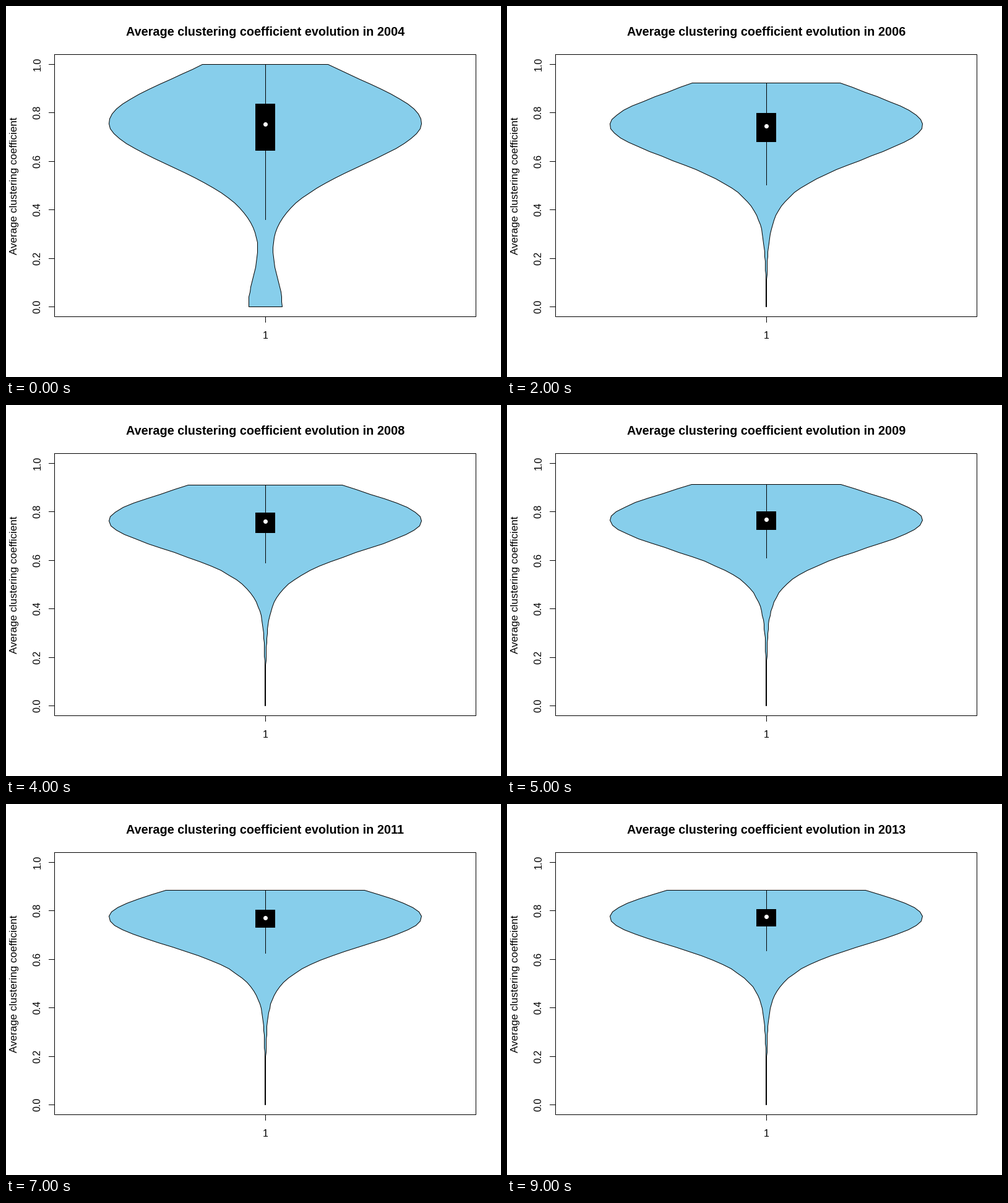
These frames come from a looping animation (800x600 px, 10000 ms). A matplotlib script:

```python
import numpy as np
import matplotlib.pyplot as plt
from matplotlib.animation import FuncAnimation
from matplotlib.patches import Circle, Polygon, Rectangle

W, H, DPI = 800, 600, 100
PX = 72 / DPI                        # points per pixel
MID, BASE, HALF = 418.6, 486, 252.6  # violin centre, zero level, half width
FONT = "Liberation Sans"


def settle(i):
    """Falls from 1 towards 0 as the yearly distributions narrow."""
    return 1 / (1 + (i / 1.75) ** 2.2)


def top_of(i):
    return round(np.interp(i, [0, 1, 2, 3, 5, 7], [94, 94, 124, 130, 128, 139]))


def outline(i):
    """Bell curve with a widening lower tail and an early bump at zero."""
    mode = np.interp(i, [0, 2, 3, 7, 9], [188, 192, 188, 183, 182.5])
    y = np.linspace(top_of(i), BASE, 50)
    d = y - mode
    growth = 4.2 - 2.8 * settle(i)
    sigma = 45 + 24.7 * settle(i) + growth * (np.maximum(d, 0) / 100) ** 2
    half = np.exp(-0.5 * (d / sigma) ** 2)
    half *= HALF / half.max()
    bump = max(0, 26.7 - 13.35 * i)
    half += bump * np.exp(-0.5 * ((BASE - y) / 54) ** 2)
    xs = np.concatenate([MID - half, (MID + half)[::-1]])
    return np.round(np.column_stack([xs, np.concatenate([y, y[::-1]])]))


def quartiles(i):
    median = np.interp(i, [0, 1, 3, 5, 9], [191, 196, 191, 185, 182])
    height = 26 + 50 * settle(i)
    upper = median - 0.43 * height
    lower = upper + height
    return [round(v) for v in (upper, median, lower, lower + 1.45 * height)]


# Whole numbers are pixel centres.
fig = plt.figure(figsize=(W / DPI, H / DPI), dpi=DPI, facecolor="white")
ax = fig.add_axes([0, 0, 1, 1])
ax.set_xlim(-0.5, W - 0.5)
ax.set_ylim(H - 0.5, -0.5)
ax.axis("off")


def line(xs, ys, z=1):
    return ax.plot(xs, ys, color="black", lw=PX, snap=False, zorder=z,
                   solid_capstyle="projecting", solid_joinstyle="miter")[0]


def label(x, y, text, size, **kw):
    return ax.text(x, y, text, fontsize=size * PX, family=FONT, ha="center",
                   va="baseline", rotation_mode="anchor", **kw)


line([78, 759, 759, 78, 78], [78, 78, 502, 502, 78])
line([419, 419], [502, 511])
label(418.5, 537, "1", 16)
for k in range(6):
    y = round(BASE - 78.4 * k)
    line([69, 78], [y, y])
    label(55, y - 1, f"{k / 5:.1f}", 16, rotation=90)
label(18, 290, "Average clustering coefficient", 17, rotation=90)
title = label(418.3, 47.5, "", 19.87, weight="bold")

violin = Polygon([[0, 0], [1, 1]], closed=True, fc="#87ceeb", ec="black",
                 lw=PX, snap=False, zorder=2)
whisker = line([419, 419], [0, 1], z=3)
box = Rectangle((402.5, 0), 32, 1, fc="black", lw=0, snap=False, zorder=4)
dot = Circle((419, 0), 3.5, fc="white", lw=0, zorder=5)
for patch in (violin, box, dot):
    ax.add_patch(patch)


def draw(i):
    upper, median, lower, end = quartiles(i)
    title.set_text(f"Average clustering coefficient evolution in {2004 + i}")
    violin.set_xy(outline(i))
    whisker.set_ydata([top_of(i), end])
    box.set_y(upper - 0.5)
    box.set_height(lower - upper)
    dot.center = (419, median)
    return title, violin, whisker, box, dot


anim = FuncAnimation(fig, draw, frames=10, interval=1000, repeat=True,
                     repeat_delay=0, blit=False)
plt.show()
```
